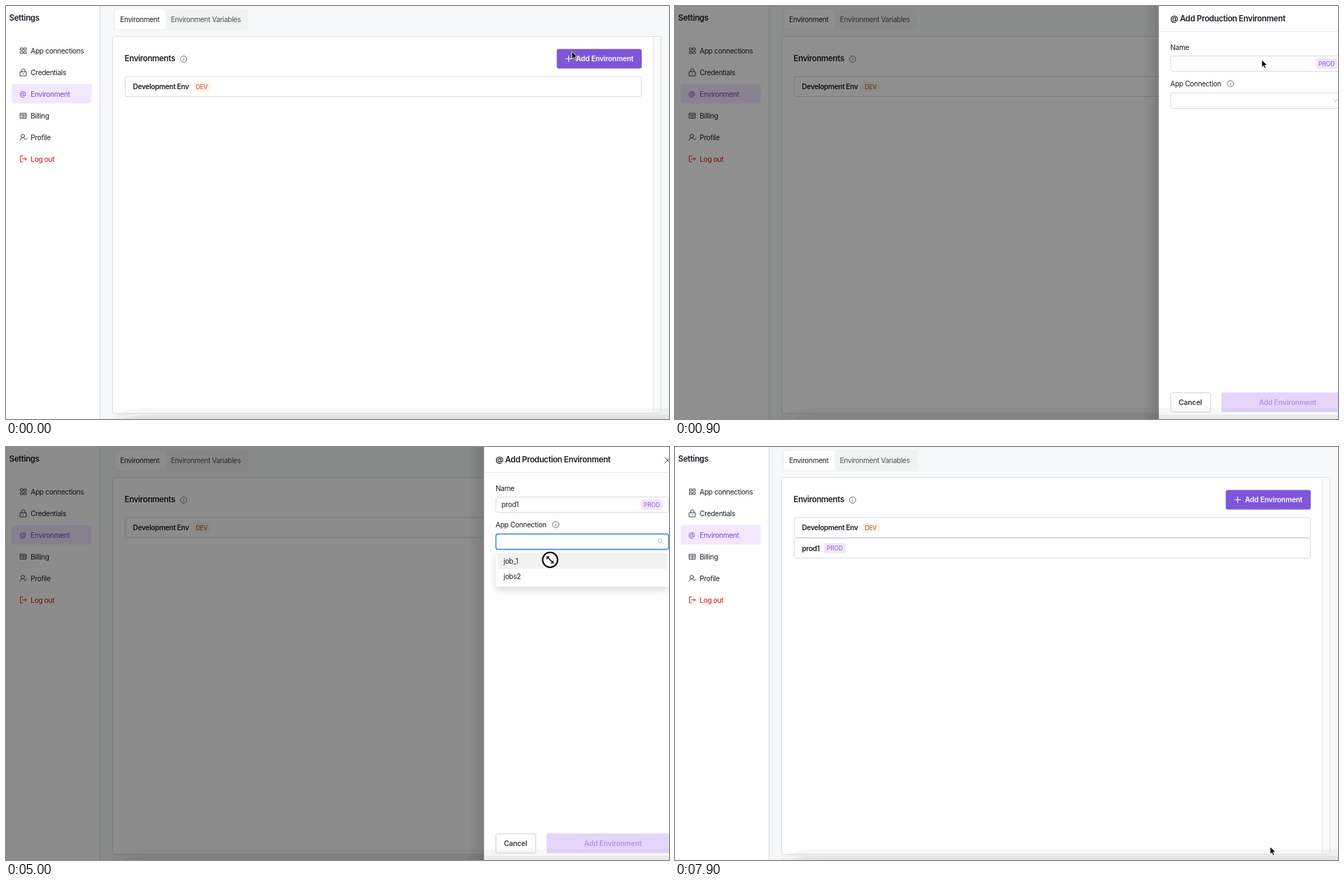
Recreate the animation shown at these times as an HTML page. Size 948 px wide and 591 px high, loop 8 s.

```html
<!DOCTYPE html>
<html lang="en">
<head>
<meta charset="utf-8">
<title>Add environment</title>
<style>
html, body { margin: 0; width: 100%; height: 100%; overflow: hidden; background: #fff; }
svg { display: block; width: 948px; height: 591px; }
text { font: 10.1px Inter, sans-serif; letter-spacing: -.031em; fill: #1c1e26; white-space: pre; }
.head { font-size: 11.5px; font-weight: 600; letter-spacing: -.029em; }
.row { font-weight: 600; letter-spacing: -.034em; }
.btn { font-weight: 600; letter-spacing: -.011em; }
.tag { font-size: 8.6px; letter-spacing: -.015em; }
.icon { fill: none; stroke: #33363f; stroke-width: .9; stroke-linecap: round; stroke-linejoin: round; }
.box { fill: #fff; stroke: #d9dbdf; }
</style>
</head>
<body>
<svg viewBox="0 0 948 591">
  <defs>
    <linearGradient id="edge"><stop offset="0" stop-opacity="0"/><stop offset="1" stop-opacity=".12"/></linearGradient>
    <filter id="soft" x="-20%" y="-50%" width="140%" height="220%">
      <feDropShadow dx="0" dy="4" stdDeviation="5.5" flood-opacity=".16"/>
    </filter>
    <g id="info" class="icon" style="stroke:#6a6d75">
      <circle r="4.5"/><path d="M0-.6V2.4M0-2.3v.1"/>
    </g>
    <g id="prodTag">
      <rect width="31" height="15" rx="3" fill="#f0e7fe"/>
      <text class="tag" x="3.8" y="10.6" style="fill:#9159d8">PROD</text>
    </g>
  </defs>

  <!-- page -->
  <rect width="948" height="591" fill="#f7f8f9"/>
  <rect width="134" height="591" fill="#fff"/>
  <path d="M134.5 0V591" stroke="#d6d9dd"/>
  <text class="head" x="4.5" y="21.2">Settings</text>
  <rect x="8" y="111.5" width="114.5" height="28" rx="4" fill="#f1e8fe"/>
  <g id="menu"></g>
  <g class="icon">
    <path d="M21 60h3v3h-3zM26 60h3v3h-3zM21 65h3v3h-3zM26 65h3v3h-3z"/>
    <path d="M20.5 94h8.5v6h-8.5zM22.5 94v-2a2.3 2.3 0 0 1 4.6 0v2M24.8 96.5v1"/>
    <path d="M20.5 153.5h8.5v7h-8.5zM20.5 155.8h8.5M25 155.8v4.7M22 158h1.5M26.5 158h1.2"/>
    <circle cx="24" cy="186" r="2.5"/>
    <path d="M20 192q.5-3.5 4-3.5 1.5 0 2.5.7M26.5 190.3l1.2 1.2 2.3-2.5"/>
    <path d="M24 214.500h-3.500v8.500h3.500M23.500 218.800h5.500M27 216.700l2.100 2.100-2.100 2.100" stroke="#d4201c"/>
  </g>

  <rect x="153" y="4" width="193" height="30.5" rx="4" fill="#f1f3f2"/>
  <rect x="156" y="5" width="72.5" height="28" rx="3" fill="#fff"/>
  <text x="163.2" y="22.8">Environment</text>
  <text x="235.8" y="22.8" style="fill:#4c4f55">Environment Variables</text>

  <rect x="152.5" y="43.5" width="784" height="539.5" rx="3" fill="#fff" stroke="#d9dce1"/>
  <rect x="926" y="44.5" width="10" height="538" fill="#f9fafa"/>
  <path d="M925.5 44V583" stroke="#e6e8ea"/>
  <text class="head" x="169.5" y="79.2">Environments</text>
  <use href="#info" x="254" y="76"/>
  <rect x="787.5" y="61.5" width="121.5" height="28" rx="3" fill="#7f56d9"/>
  <path d="M800 75.5h9M804.5 71v9" stroke="#fff" stroke-width="1.1"/>
  <text class="btn" x="815" y="79.2" style="fill:#fff">Add Environment</text>
  <rect class="box" x="170.5" y="101" width="738" height="28.5" rx="2"/>
  <text class="row" x="181.5" y="119.2">Development Env</text>
  <rect x="267.5" y="108" width="25.5" height="15" rx="3" fill="#fef5ea"/>
  <text class="tag" x="271.5" y="118.5" style="fill:#b04a1e">DEV</text>
  <g id="newRow">
    <rect class="box" x="170.5" y="130.5" width="738" height="28.5" rx="2"/>
    <text class="row" x="181.5" y="148.7">prod1</text>
    <use href="#prodTag" x="213" y="137.5"/>
  </g>

  <rect id="mask" width="948" height="591"/>

  <!-- drawer -->
  <g id="drawer">
    <rect x="659.5" width="24" height="591" fill="url(#edge)"/>
    <rect x="683.5" width="300" height="591" fill="#fff"/>
    <path d="M684 36.5H984" stroke="#e9ebed"/>
    <text class="head" x="700" y="21.7">@ Add Production Environment</text>
    <path class="icon" d="M942 15l8 8M950 15l-8 8"/>
    <text x="700" y="62.7">Name</text>
    <rect id="nameGlow" x="700" y="71" width="248" height="23" rx="4" fill="none" stroke="#7f56d9" stroke-opacity=".15" stroke-width="3"/>
    <rect id="nameBox" class="box" x="700.5" y="71.5" width="247" height="22" rx="3"/>
    <text id="name" x="708.5" y="86"></text>
    <path id="caret" d="M0 76V88" stroke="#111"/>
    <use href="#prodTag" x="908" y="75"/>

    <text x="700" y="114.5">App Connection</text>
    <use href="#info" x="786" y="111"/>
    <rect id="pickBox" class="box" x="700.5" y="124.5" width="247" height="22" rx="3"/>
    <text id="pick" x="708.5" y="138.7">job_1</text>
    <path id="chevron" class="icon" d="M932.5 133l3.5 4 3.5-4" style="stroke:#b4b6bb"/>
    <g id="search" class="icon" style="stroke:#b4b6bb"><circle cx="935" cy="134" r="2.6"/><path d="M937 136l2.5 2.5"/></g>
    <g id="list">
      <rect x="700.5" y="149" width="247.5" height="51" rx="4" fill="#fff" filter="url(#soft)"/>
      <rect x="703" y="152" width="242.5" height="22.5" rx="2" fill="#f1f3f3"/>
      <text x="711.5" y="166.7">job_1</text>
      <text x="711.5" y="189.3">jobs2</text>
    </g>

    <rect class="box" x="700.5" y="553.5" width="57" height="27.5" rx="2" style="stroke:#d0d3d8"/>
    <text class="btn" x="712" y="570.8" style="fill:#34363e">Cancel</text>
    <rect id="glow" x="772" y="552" width="192" height="30" rx="4" fill="none" stroke="#c9b4f6" stroke-width="3"/>
    <rect id="add" x="773" y="553" width="190" height="28" rx="2"/>
    <path id="spinner" d="M0-4.5A4.5 4.5 0 0 1 4.5 0" fill="none" stroke="#fff" stroke-width="1.1"/>
    <text id="addText" class="btn" y="570.8">Add Environment</text>
  </g>

  <!-- window shadow along the bottom -->
  <path d="M150 591Q165 576 205 575.5H948V591Z" fill-opacity=".03"/>
  <path d="M165 591Q180 585.5 210 585H948V591Z" fill-opacity=".05"/>

  <path id="arrow" d="M0 0V10.8L2.5 8.5 4.1 12.3 6 11.5 4.4 7.8H7.8Z" stroke="#fff" stroke-width=".8"/>
  <g id="resize">
    <circle r="10.7" fill="#fff" stroke="#000" stroke-width="2"/>
    <path d="M-3.5-3.5L3.5 3.5" stroke="#000" stroke-width="1.4"/>
    <path d="M-5-5h4.5L-5-.5ZM5 5H.5L5 .5Z"/>
  </g>
</svg>
<script>
const LOOP = 8000, DRAWER = 296;
const $ = id => document.getElementById(id);
const show = (id, on) => $(id).style.display = on ? '' : 'none';
const between = (t, a, b) => t >= a && t < b;
const clamp = v => Math.min(1, Math.max(0, v));

const labels = ['App connections', 'Credentials', 'Environment', 'Billing', 'Profile', 'Log out'];
const tints = { 2: '#7548cb', 5: '#d4100f' };
$('menu').innerHTML = labels.map((label, i) =>
  `<text x="35.3" y="${67.7 + 31 * i}" style="fill:${tints[i] || '#1c1e26'}">${label}</text>`
).join('') + '<text x="19.3" y="129.3" style="fill:#7548cb">@</text>';

// The CSS "ease" curve, cubic-bezier(.25, .1, .25, 1)
function ease(x) {
  const curve = (s, a, b) => 3 * s * (1 - s) ** 2 * a + 3 * s * s * (1 - s) * b + s ** 3;
  let lo = 0, hi = 1;
  for (let i = 0; i < 20; i++) {
    const mid = (lo + hi) / 2;
    if (curve(mid, .25, .25) < x) lo = mid; else hi = mid;
  }
  return curve(lo, .1, 1);
}

// Pointer stops: time, x, y
const stops = [
  [0, 809, 65], [600, 839, 77], [950, 839, 77], [1650, 777, 80], [3650, 777, 80],
  [3880, 781, 131], [4500, 779, 131], [4900, 778, 161.5], [5250, 778, 161.5],
  [6000, 850, 569], [6900, 850, 569], [7200, 851, 572], [LOOP, 851, 572]
];
function pointer(t) {
  const i = stops.findIndex(s => s[0] > t);
  const [t0, x0, y0] = stops[i - 1], [t1, x1, y1] = stops[i];
  const u = (t - t0) / (t1 - t0), k = u * u * (3 - 2 * u);
  return `translate(${x0 + (x1 - x0) * k} ${y0 + (y1 - y0) * k})`;
}

function border(id, color, width = 1) {
  $(id).style.stroke = color;
  $(id).style.strokeWidth = width;
}

function draw(t) {
  const open = ease(clamp((t - 665) / 300)) * (1 - ease(clamp((t - 7520) / 280)));
  show('drawer', open > 0);
  $('drawer').setAttribute('transform', `translate(${DRAWER * (1 - open)} 0)`);
  $('mask').style.opacity = .45 * open;
  show('newRow', t >= 7600);

  // name field
  const focused = between(t, 1700, 4200);
  const typed = t < 2400 ? 0 : Math.floor((t - 2400) / 200) + 1;
  $('name').textContent = 'prod1'.slice(0, typed);
  border('nameBox', focused ? '#7f56d9' : '#d9dbdf');
  show('nameGlow', focused);
  show('caret', between(t, 1700, 3700));
  $('caret').setAttribute('transform',
    `translate(${709.5 + (typed ? $('name').getComputedTextLength() : 0)} 0)`);

  // connection picker
  const listed = between(t, 4250, 5400);
  const active = between(t, 4200, 7000);
  const hovered = between(t, 3800, 4200);
  border('pickBox', active ? '#2f88e6' : hovered ? '#b49ce4' : '#d9dbdf', active ? 1.4 : 1);
  show('list', listed);
  $('list').style.opacity = clamp((t - 4250) / 200) * clamp((5400 - t) / 150);
  show('search', listed);
  show('chevron', !listed);
  show('pick', t >= 5250);

  // submit button
  const ready = t >= 5250, loading = t >= 7300;
  $('add').style.fill = loading ? '#9c80da' : ready ? '#7f56d9' : '#e5d5fd';
  $('addText').style.fill = ready ? '#fff' : '#b393e8';
  $('addText').setAttribute('x', loading ? 834.3 : 826.7);
  show('spinner', loading);
  $('spinner').setAttribute('transform', `translate(824 567) rotate(${(t - 7500) * .36})`);
  show('glow', loading);
  $('glow').style.opacity = clamp((7900 - t) / 600);

  // pointer
  const resizing = between(t, 4900, 5250);
  show('arrow', !resizing && !between(t, 2450, 3700));
  show('resize', resizing);
  for (const id of ['arrow', 'resize']) $(id).setAttribute('transform', pointer(t));
}

const start = performance.now();
function tick() {
  draw((performance.now() - start) % LOOP);
  requestAnimationFrame(tick);
}
tick();
</script>
</body>
</html>
```
